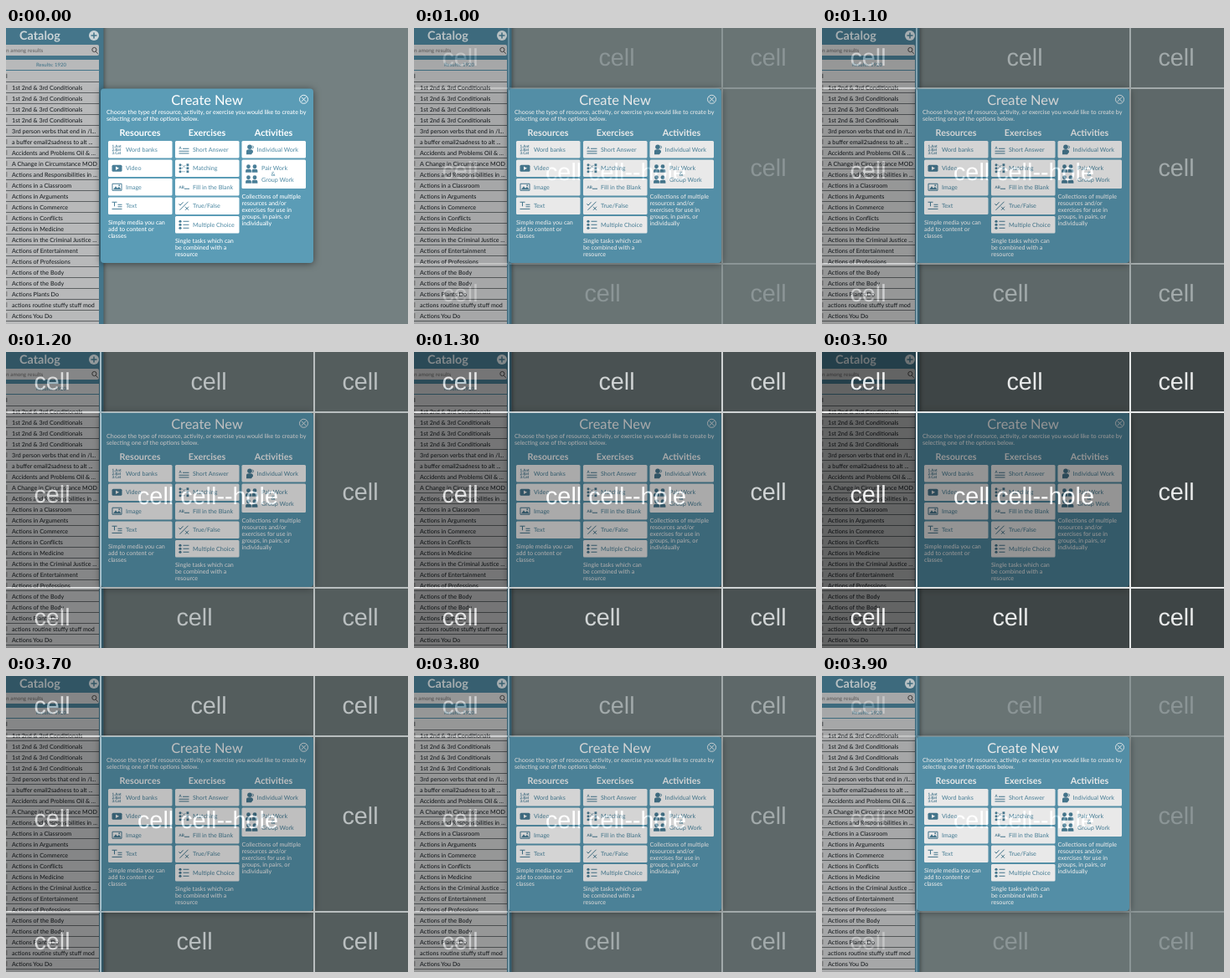
Recreate the animation shown at these times as an HTML page. Size 480 px wide and 354 px high, loop 4000 ms.

```html
<!DOCTYPE html>
<html lang="en">
<head>
<meta charset="utf-8">
<title>Create New dialog with grid overlay</title>
<style>
  html, body { margin: 0; height: 100%; overflow: hidden; background: #748081; }
  svg { display: block; width: 480px; height: 354px; }
  text { font: 500 7.15px Lato, "Open Sans", sans-serif; text-rendering: geometricPrecision; white-space: pre; }
  .mid { text-anchor: middle; }
  .page { fill: #1d2225; }
  .white { fill: #fff; }
  .label { fill: #5b92aa; }
  .title { font-size: 16.4px; font-weight: 400; }
  .head { font-size: 10.8px; font-weight: 700; }
  .brand { font-size: 14.4px; font-weight: 700; fill: #ccd5d8; }
  .tiny { font-size: 4.6px; font-weight: 700; fill: #4a7f98; }
  .hint { font-size: 6.4px; fill: #666; }
  .results { font-size: 6px; fill: #44758a; }
  .cell { font: 28.8px "Liberation Sans", Arial, sans-serif; fill: #fff; }
  .modal { filter: drop-shadow(0 1px 4px rgba(0, 0, 0, .5)); }
  .icon { fill: #4a7f98; stroke: none; }
  .line { fill: none; stroke: #4a7f98; stroke-width: 1; }
</style>
</head>
<body>
<svg id="stage" viewBox="0 0 480 354"></svg>
<script>
const TEAL = '#5b9cb6', DIM_TEAL = '#44758a', PAPER = '#b8b9ba', INK = '#4a7f98';

const rect = (x, y, w, h, fill, extra = '') =>
  `<rect x="${x}" y="${y}" width="${w}" height="${h}" fill="${fill}" ${extra}/>`;
const text = (x, y, str, cls) =>
  `<text x="${x}" y="${y}" class="${cls}">${str.replace(/&/g, '&amp;')}</text>`;
const lines = (x, y, rows, cls, step = 8) =>
  rows.map((row, i) => text(x, y + i * step, row, cls)).join('');
const path = (d, cls = 'line', extra = '') => `<path d="${d}" class="${cls}" ${extra}/>`;
const dot = (x, y, r) => `<circle cx="${x}" cy="${y}" r="${r}" class="icon"/>`;
const person = (x, y) => dot(x, y, 2.4) + path(`M${x - 3.4} ${y + 7}v-2q0-2 2-2h2.8q2 0 2 2v2z`, 'icon');

function sidebar() {
  const conditionals = Array(4).fill('1st 2nd & 3rd Conditionals');
  const items = [...conditionals,
    '3rd person verbs that end in /l...', 'a buffer email2sadness to alt ...',
    'Accidents and Problems Oil & ...', 'A Change in Circumstance MOD',
    'Actions and Responsibilities in ...', 'Actions in a Classroom', 'Actions in Arguments',
    'Actions in Commerce', 'Actions in Conflicts', 'Actions in Medicine',
    'Actions in the Criminal Justice ...', 'Actions of Entertainment', 'Actions of Professions',
    'Actions of the Body', 'Actions of the Body', 'Actions Plants Do',
    'actions routine stuffy stuff mod', 'Actions You Do'];
  const rows = items.map((item, i) => {
    const y = 71 + i * 13;
    return rect(0, y + 6, 111, 1, '#5c6062')
      + path(`M0 ${y - 2}h1.5M0 ${y}h1.5M0 ${y + 2}h1.5`, 'line', 'style="stroke:#555"')
      + text(7, y + 2.6, item, 'page');
  }).join('');
  return `<g style="filter:drop-shadow(1px 0 2px rgba(0,0,0,.4))">${rect(-5, -5, 121.5, 364, DIM_TEAL)}</g>`
    + text(16, 14, 'Catalog', 'brand')
    + '<circle cx="105" cy="9" r="6" fill="#ccd5d8"/>'
    + path('M105 5.5v7M101.5 9h7', 'line', `style="stroke:${DIM_TEAL};stroke-width:1.5"`)
    + rect(-4, 20, 115, 13, PAPER, 'rx="2"') + text(0, 28.5, 'n among results', 'hint')
    + path('M107.3 28.3l2.4 2.4M108 26a2.6 2.6 0 1 1-5.2 0a2.6 2.6 0 1 1 5.2 0', 'line', 'style="stroke:#444"')
    + rect(0, 38, 111, 316, PAPER) + text(36, 46.3, 'Results: 1920', 'results')
    + rect(0, 50, 111, 1, DIM_TEAL) + text(0, 60, 'l', 'page') + rect(0, 64, 111, 1, '#5c6062') + rows;
}

// Icons are drawn around the button's vertical centre, starting at x = 0.
const icons = {
  words: lines(0, -2.5, ['1.Ant', '2.Bat', '3.Cat'], 'tiny', 4.2),
  video: rect(0, -4, 12, 8, INK, 'rx="1.5"') + path('M4.5-2.2L8.5 0L4.5 2.2z', 'white'),
  image: path('M.5-4h11v8h-11z') + path('M1.5 3L4.5-1L6.5 1.5L8.5-.5L11 3z', 'icon') + dot(8.7, -2, 0.9),
  text: path('M0-4.5h6M3-4.5v5M7-1.5h5M7 1h5M0 3.7h12'),
  answer: text(0, -.5, 'A', 'tiny') + path('M4.5-1h7.5M0 2h12M0 4.7h12'),
  match: [-4, 0, 4].map(y => dot(1.5, y, 1.5) + rect(9, y - 1.4, 2.8, 2.8, INK)).join('')
    + path('M4-4L8 0M4 0L8-4M4 4h4', 'line', 'stroke-dasharray="1 1"'),
  blank: text(0, 1.7, 'AB', 'tiny') + path('M6.5 2h6'),
  truth: path('M1 5L11-5M0-2.5l1.5 1.8L5-4.5M7.5 1l4 4M11.5 1l-4 4'),
  choice: [-4, 0, 4].map(y => dot(1.5, y, 1.6) + path(`M5 ${y}h7`)).join(''),
  solo: dot(5, -3, 2.8) + path('M1 6V2Q1 0 4 0h2Q9 0 9 3L7 6z', 'icon') + path('M8.5-4.5q2 1.5 0 3.5'),
  group: [[3.5, -9], [11, -9], [3.5, 4], [11, 4]].map(([x, y]) => person(x, y)).join('')
};

function button(x, y, icon, label, h = 20.5) {
  return rect(x, y, 76.5, h, '#fff', 'rx="1.5"')
    + `<g transform="translate(${x + 4.5} ${y + h / 2})">${icons[icon]}</g>`
    + (label ? text(x + (icon === 'solo' ? 18 : 21), y + 12.7, label, 'label') : '');
}

function column(x, heading, buttons, note, noteY) {
  return text(x + 38, 128.7, heading, 'head white mid')
    + buttons.map(([icon, label, h], i) => button(x, 135 + i * 22.5, icon, label, h)).join('')
    + lines(x, noteY, note, 'white');
}

function modal() {
  return `<g class="modal">${rect(113, 72.5, 254, 208.5, TEAL, 'rx="4"')}</g>`
    + text(240, 91.5, 'Create New', 'title white mid')
    + '<g fill="none" stroke="#fff" stroke-width=".9"><circle cx="355.5" cy="85.3" r="5"/><path d="M352.8 82.6l5.4 5.4m0-5.4l-5.4 5.4"/></g>'
    + lines(120, 103.3, ['Choose the type of resource, activity, or exercise you would like to create by',
      'selecting one of the options below.'], 'white')
    + column(122, 'Resources', [['words', 'Word banks'], ['video', 'Video'], ['image', 'Image'], ['text', 'Text']],
      ['Simple media you can', 'add to content or', 'classes'], 234.5)
    + column(202, 'Exercises', [['answer', 'Short Answer'], ['match', 'Matching'], ['blank', 'Fill in the Blank'],
      ['truth', 'True/False'], ['choice', 'Multiple Choice']],
      ['Single tasks which can', 'be combined with a', 'resource'], 256.5)
    + column(281.5, 'Activities', [['solo', 'Individual Work'], ['group', '', 34.5]],
      ['Collections of multiple', 'resources and/or', 'exercises for use in', 'groups, in pairs, or', 'individually'], 203.8)
    + text(305, 170, 'Pair Work', 'label') + text(319, 177, '&', 'label mid') + text(305, 184, 'Group Work', 'label');
}

function overlay() {
  const cells = [[55, 45], [242, 45], [423, 45], [55, 180], [423, 177], [55, 327], [225, 327], [423, 327]];
  return path('M0 0H480V354H0zM113 72V282H368V72z', 'shade', 'fill-rule="evenodd" fill-opacity=".55"')
    + rect(113, 72, 255, 210, '#000', 'fill-opacity=".5"')
    + path('M113 0V354M368 0V354M0 72H480M0 282H480', 'grid', 'stroke="#fff" stroke-width="2"')
    + cells.map(([x, y]) => text(x, y, 'cell', 'cell mid')).join('')
    + text(241, 182, 'cell cell--hole', 'cell mid');
}

const stage = document.getElementById('stage');
stage.innerHTML = rect(0, 0, 480, 354, '#748081') + sidebar() + modal() + `<g id="overlay">${overlay()}</g>`;
const overlayGroup = document.getElementById('overlay');

// The overlay fades in and out in sixths, one step every 100 ms.
function draw() {
  const tick = Math.floor(performance.now() % 4000 / 100);
  const level = Math.max(0, Math.min(tick - 9, 40 - tick, 6));
  overlayGroup.setAttribute('opacity', level / 6);
  requestAnimationFrame(draw);
}
draw();
</script>
</body>
</html>
```
